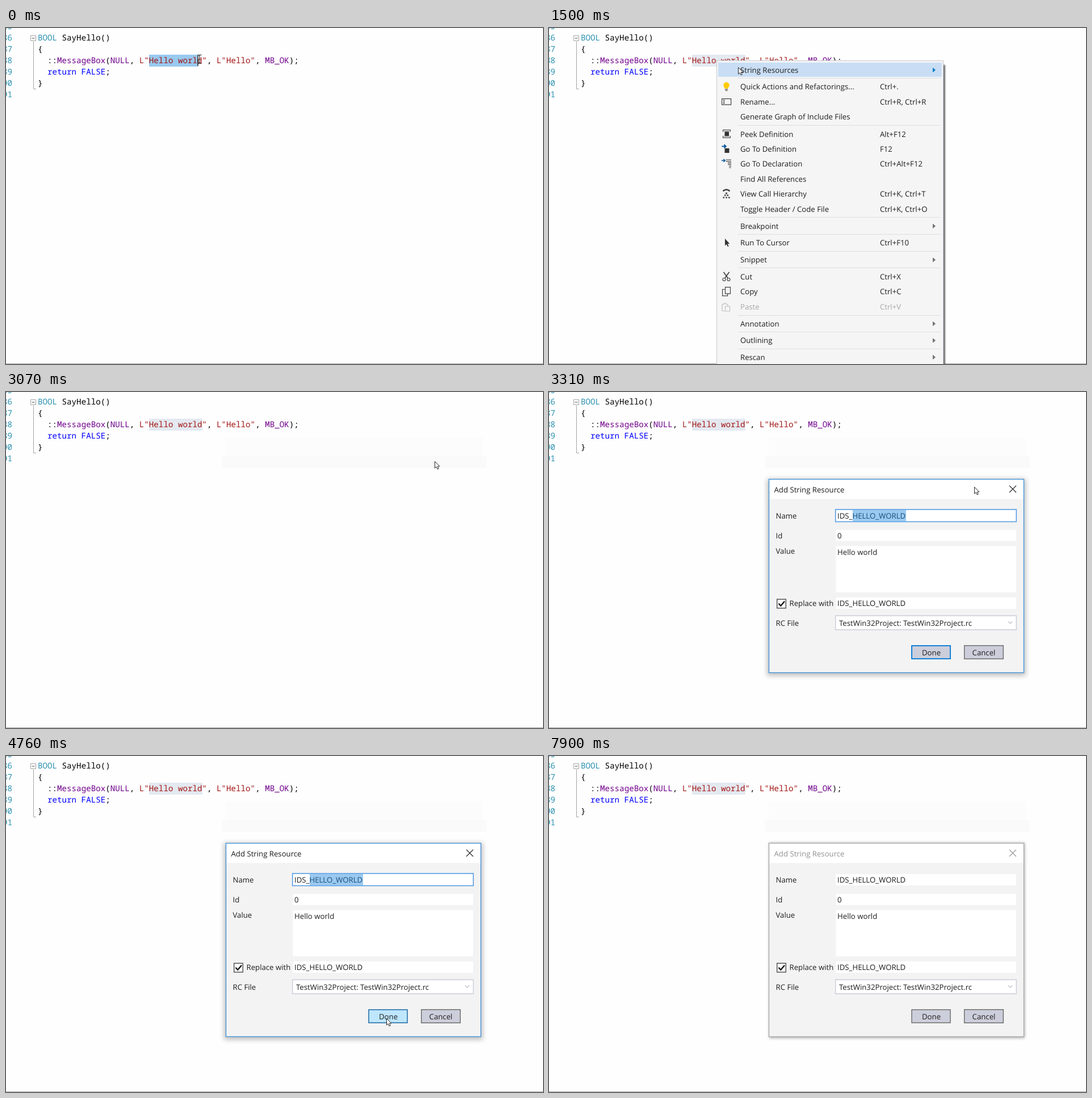
These frames come from a looping animation (946 by 592 pixels, 8000 ms). An HTML page:

```html
<!DOCTYPE html>
<html lang="en">
<head>
<meta charset="utf-8">
<title>Add a string resource</title>
<style>
html, body { margin: 0; width: 100%; height: 100%; overflow: hidden; background: #fefefe; }
svg { display: block; width: 946px; height: 592px; }
text { white-space: pre; text-rendering: geometricPrecision; font: 13.2px "Open Sans", "Noto Sans", sans-serif; fill: #1e1e1e; }
.code text { font: 14.2px "Noto Sans Mono", "DejaVu Sans Mono", monospace; fill: #000; }
.code .num, .code .type { fill: #2b91af; }
.code .mac { fill: #6f008a; }
.code .str { fill: #a31515; }
.code .key { fill: #0000ff; }
</style>
</head>
<body>
<svg id="stage" viewBox="0 0 946 592" xmlns="http://www.w3.org/2000/svg">
  <defs>
    <filter id="soft" x="-10%" y="-10%" width="120%" height="120%"><feGaussianBlur stdDeviation="4.5"/></filter>
    <filter id="tight" x="-10%" y="-10%" width="120%" height="120%"><feGaussianBlur stdDeviation="2.5"/></filter>
    <filter id="edge" x="-10%" y="-10%" width="120%" height="120%"><feGaussianBlur stdDeviation="1"/></filter>
  </defs>
  <rect width="946" height="592" fill="#fefefe"/>
  <path d="M0 591.5H946" stroke="#a5a5a5"/>

  <g id="ghost">
    <rect x="387" y="80" width="453" height="33" fill="#fcfcfc"/>
    <rect x="380" y="113" width="467" height="21" fill="#fafafa"/>
  </g>

  <g class="code">
    <rect id="sel" x="252" y="47" height="21"/>
    <path d="M43.5 13.5h9v9h-9zM48.5 24V107.500H53" fill="none" stroke="#a5a5a5"/>
    <path d="M45.500 18h5" stroke="#555"/>
    <g id="lines"></g>
    <path id="caret" d="M346 48V67" stroke="#000" stroke-width="1.2"/>
  </g>

  <g id="menu">
    <rect x="300" y="65" width="398" height="540" fill="#444" opacity=".75" filter="url(#edge)"/>
    <rect x="295.500" y="57.500" width="399" height="550" fill="#f5f5f5" stroke="#c6c9d2"/>
    <rect id="hot" x="298" y="61" width="394" height="25" fill="#c9def5"/>
    <g id="items"></g>
    <g id="icons" fill="none" stroke="#424242" stroke-width="1.2">
      <g stroke="none">
        <path d="M312.500 95.500a5.200 5.200 0 0 1 5.300 5.200c0 2.500-2 3.600-2.600 6h-5.400c-.6-2.400-2.600-3.500-2.600-6a5.200 5.200 0 0 1 5.300-5.200z" fill="#ffcc00"/>
        <path d="M310 107.500h5v1.200h-5zM310.500 109.500h4v1.300h-4z" fill="#555"/>
      </g>
      <path d="M304.600 124.600h16v10.600h-16zM307 127h2.500M307 132.700h2.500M308.200 127v5.700"/>
      <path d="M306 179.500h14M308.500 182h9M306 193.500h14M308.500 191h9M306.600 180v3M319.400 180v3M306.600 190v3M319.400 190v3"/>
      <path d="M309.500 183h7.500v7h-7.500z" fill="#333" stroke="none"/>
      <path d="M309.500 212h8v8h-8z" fill="#333" stroke="none"/>
      <path d="M304.500 208.500h7M308.500 205.300l3.200 3.200l-3.200 3.200" stroke="#00539c" stroke-width="1.900"/>
      <path d="M304 233.500h6M307.500 231l2.500 2.500l-2.500 2.500" stroke="#00539c" stroke-width="1.600"/>
      <path d="M311.500 232h9.500M311.500 234.800h9.500M315 237.600h6M315 240.400h6M317 243.200h4M317 246h4"/>
      <path d="M307.500 288v-1.500q5-3.600 10 0v1.500" stroke-width="2.400"/>
      <path d="M311 290h3v2.500h-3zM309 293.500h2.500v2.500H309zM313.500 293.500h2.500v2.500h-2.500zM306.500 297.500h2.500v2.500h-2.500zM311.300 297.500h2.500v2.500h-2.500zM316 297.500h2.500v2.500H316z" fill="#424242" stroke="none"/>
      <path d="M310 371v12.500l2.800-2.600l2 4.400l1.800-.8l-2-4.300h3.700z" fill="#333" stroke="none"/>
      <path d="M307.500 430l7.500 10.500M317.500 430l-7.500 10.500" stroke-width="1.700"/>
      <circle cx="308.500" cy="443" r="2.500"/><circle cx="316.500" cy="443" r="2.500"/>
      <path d="M310.500 456.600h9v11.500h-9zM310 460.500h-4.400v11.300h9V468.500"/>
      <path d="M309.500 498.500h-4.500v-11.500h3v-2h4v2h3v3M310.500 490.500h8v8.500h-8z" stroke="#bfbfbf"/>
    </g>
  </g>

  <g id="sub">
    <rect x="699" y="67" width="260" height="56.500" fill="#444" opacity=".75" filter="url(#edge)"/>
    <rect x="693.500" y="61.500" width="260" height="59" fill="#f5f5f5" stroke="#c6c9d2"/>
    <rect x="695" y="64" width="251" height="26" fill="#c9def5"/>
    <g id="subitems"></g>
  </g>

  <g id="dialog">
    <rect id="glow" y="153" fill="#000"/>
    <rect x="387" y="153" width="450" height="342" fill="#f3f3f3"/>
    <rect x="388" y="154" width="448" height="34.500" fill="#fff"/>
    <rect id="frame" x="387.500" y="153.700" width="449" height="340.800" fill="none" stroke-width="1.300"/>
    <g id="title">
      <text x="396.500" y="177">Add String Resource</text>
      <path d="M811 165l12 12M823 165l-12 12" stroke="#222" stroke-width="1.100"/>
    </g>
    <g fill="#fff">
      <rect x="505" y="208" width="318" height="20"/>
      <rect x="505.500" y="243" width="317.500" height="19.500"/>
      <rect x="505.500" y="271.500" width="317.500" height="81.500"/>
      <rect x="505.500" y="362" width="317.500" height="20"/>
      <rect x="504.700" y="394.200" width="318.600" height="24.600" stroke="#cccedb" stroke-width="1.500"/>
      <rect x="401.700" y="365.200" width="15.600" height="15.600" stroke="#555" stroke-width="1.500"/>
    </g>
    <path d="M404.500 372.800l3.800 4l6.700-8" fill="none" stroke="#111" stroke-width="2.300"/>
    <path d="M809 404.300l3.500 3.500l3.500-3.500" fill="none" stroke="#b9bac6" stroke-width="1.200"/>
    <g id="focus">
      <rect x="504.700" y="207" width="318.600" height="21.500" fill="none" stroke="#569de5" stroke-width="1.600"/>
      <rect x="535" y="208" width="94" height="20" fill="#99c9ef"/>
    </g>
    <g id="labels"></g>
    <rect id="done" x="639" y="447" width="68" height="23"/>
    <rect x="731.700" y="446.800" width="68.600" height="23.400" fill="#cccedb" stroke="#707070" stroke-width="1.500"/>
    <text x="673.500" y="464" text-anchor="middle">Done</text>
    <text x="766" y="464" text-anchor="middle">Cancel</text>
  </g>

  <g id="arrow">
    <path d="M.5 .5V12.200L3.200 9.700L5.200 14L7.200 13.100L5.300 9H8.900z" fill="#fff" stroke="#111" stroke-width=".9"/>
  </g>
  <g id="beam" fill="none">
    <path d="M-3.500 -7.500H-1L0 -6.500L1 -7.500H3.500M0 -6.500V6.500M-3.500 7.500H-1L0 6.500L1 7.500H3.500" stroke="#222" stroke-width="1.200"/>
  </g>
</svg>
<script>
const $ = id => document.getElementById(id);
const label = (x, y, s, extra = "") => `<text x="${x}" y="${y}" ${extra}>${s}</text>`;
const span = (c, s) => `<tspan class="${c}">${s}</tspan>`;

// Editor text
const rows = [
  "",
  span("type", "BOOL") + " SayHello()",
  "{",
  "  ::" + span("mac", "MessageBox") + "(" + span("mac", "NULL") + ", " + span("str", 'L"Hello world"') +
    ", " + span("str", 'L"Hello"') + ", " + span("mac", "MB_OK") + ");",
  "  " + span("key", "return FALSE") + ";",
  "}",
  ""
];
$("lines").innerHTML = rows.map((s, i) => {
  const y = Math.round(2.4 + i * 19.9);
  return label(-6, y, 85 + i, 'class="num"') + label(56, y, s);
}).join("");

// Menu rows: centre y, caption, shortcut (">" opens a submenu)
const entries = [
  [74, "String Resources", ">"],
  [103.5, "Quick Actions and Refactorings...", "Ctrl+."],
  [130, "Rename...", "Ctrl+R, Ctrl+R"],
  [156.5, "Generate Graph of Include Files", ""],
  [187, "Peek Definition", "Alt+F12"],
  [213, "Go To Definition", "F12"],
  [239.5, "Go To Declaration", "Ctrl+Alt+F12"],
  [266, "Find All References", ""],
  [292.5, "View Call Hierarchy", "Ctrl+K, Ctrl+T"],
  [319, "Toggle Header / Code File", "Ctrl+K, Ctrl+O"],
  [349, "Breakpoint", ">"],
  [378.5, "Run To Cursor", "Ctrl+F10"],
  [408.5, "Snippet", ">"],
  [438, "Cut", "Ctrl+X"],
  [464.5, "Copy", "Ctrl+C"],
  [491, "Paste", "Ctrl+V"],
  [521, "Annotation", ">"],
  [550.5, "Outlining", ">"],
  [580, "Rescan", ">"]
];
$("items").innerHTML = entries.map(([y, name, keys], i) => {
  const dim = name === "Paste" ? 'style="fill:#a8a8a8"' : "";
  const base = Math.floor(y + 5);
  const right = keys === ">"
    ? `<path d="M676 ${y - 4.2}l5 4.200l-5 4.200z" fill="${i ? "#717171" : "#007acc"}"/>`
    : label(583, base, keys, dim);
  return label(337, base, name, dim) + right;
}).join("") + [88, 171, 333, 363, 393, 422, 506, 535, 565]
  .map(y => `<path d="M333 ${y + .5}H690" stroke="#dcdfe4"/>`).join("");

$("subitems").innerHTML = label(734.5, 82, "Add String Resource") + label(905, 82, "Alt+A") +
  label(734.5, 108, "Edit String Resource") + label(904.5, 108, "Alt+E");

$("labels").innerHTML = [
  [399.5, 223, "Name"], [399.5, 258, "Id"], [399.5, 285, "Value"],
  [423.5, 377, "Replace with"], [399.5, 412, "RC File"],
  [508, 223, 'IDS_<tspan id="picked">HELLO_WORLD</tspan>'], [508, 258, "0"],
  [508, 287, "Hello world"], [508, 377, "IDS_HELLO_WORLD"],
  [511, 412, "TestWin32Project: TestWin32Project.rc"]
].map(a => label(...a)).join("");

// Pointer moves: start time, number of steps, end x, end y
const LOOP = 8000, STEP = 120;
const moves = [
  [0, 1, 341, 55], [120, 2, 342, 58], [390, 3, 302, 58], [880, 1, 295, 57],
  [1500, 1, 333, 69], [1620, 1, 355, 68], [1870, 7, 758, 79], [2710, 2, 760, 77],
  [2950, 4, 749, 167], [3430, 1, 746, 195], [3550, 4, 692, 506], [4030, 3, 686, 475],
  [4390, 1, 675, 468], [4510, 1, 670, 464], [4760, 1, 670, 462], [5630, 4, 830, 586]
];
const smooth = u => u * u * (3 - 2 * u);

function pointer(t) {
  let x = 341, y = 55;
  for (const [start, n, ex, ey] of moves) {
    if (t < start) break;
    const u = smooth(Math.min(1, (Math.floor((t - start) / STEP) + 1) / n));
    x += (ex - x) * u;
    y += (ey - y) * u;
  }
  return [x, y];
}

const show = (id, on) => { $(id).style.display = on ? "" : "none"; };
const set = (id, attrs) => { for (const k in attrs) $(id).setAttribute(k, attrs[k]); };

function draw(t) {
  const menu = t >= 1250 && t < 2950;
  const active = t < 7900;
  const hover = t >= 4390 && t < 5630;

  set("sel", { width: t < 120 ? 86 : 94, fill: t < 1250 ? "#99c9ef" : "#e4e9f0" });
  show("caret", t < 880);
  set("caret", { d: `M${t < 120 ? 338 : 346} 48V67` });
  show("menu", menu);
  show("hot", t >= 1500);
  show("sub", menu && t >= 2110);
  show("ghost", t >= 3070);
  show("dialog", t >= 3190);
  show("focus", active);

  set("frame", { stroke: active ? "#3a8fd8" : "#a8a8a8" });
  set("glow", active
    ? { filter: "url(#soft)", opacity: .24, x: 384, width: 456, height: 347 }
    : { filter: "url(#tight)", opacity: .32, x: 388, width: 450, height: 344 });
  set("title", { opacity: active ? 1 : .48 });
  $("picked").style.fill = active ? "#1d4f7c" : "#1e1e1e";
  set("done", {
    fill: hover ? "#bee6fd" : "#cccedb",
    stroke: hover ? "#3c7fb1" : active ? "#0078d7" : "#707070",
    "stroke-width": active ? 1.8 : 1.5
  });

  const place = { transform: `translate(${pointer(t).map(Math.round)})` };
  set("arrow", place);
  set("beam", place);
  show("beam", t < 390);
  show("arrow", t >= 390 && t < 6140);
}

const begin = performance.now();
function tick() {
  draw((performance.now() - begin) % LOOP);
  requestAnimationFrame(tick);
}
tick();
</script>
</body>
</html>
```
